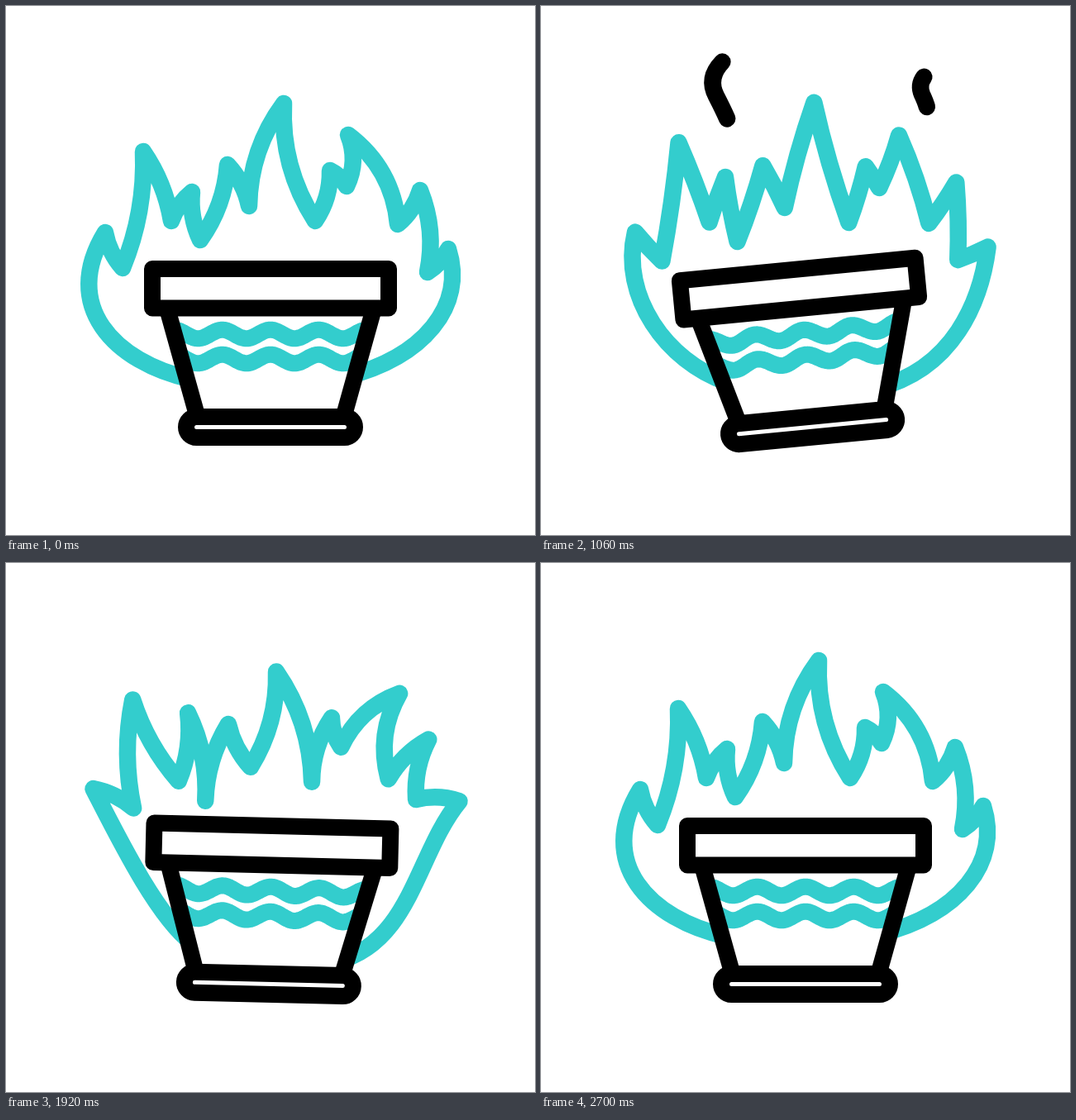
Recreate the animation shown at these times as an HTML page with a canvas. Size 640 by 640 pixels, loop 3.02 s.

```html
<!DOCTYPE html>
<html lang="en">
<head>
<meta charset="utf-8">
<title>Fire bucket</title>
<style>
html, body { margin: 0; width: 100%; height: 100%; overflow: hidden; background: #fff; }
canvas { display: block; width: 640px; height: 640px; }
</style>
</head>
<body>
<canvas id="stage" width="640" height="640"></canvas>
<script>
const ctx = document.getElementById('stage').getContext('2d');
const LOOP = 3020, TEAL = '#33cdcd', INK = '#000', MID = 320;

// Each tongue rests at tip, stretches by reach as the fire flares, and may sag later on.
// The dip is the notch to its right; a positive curl bulges both flanks to the right.
const tongues = [
  { tip: [120, 274], reach: [-15, -1], dip: [141, 317], curl: -0.14 },
  { tip: [166, 176], reach: [10, -36], dip: [200, 260], curl: 0.11, sag: [-24, 26] },
  { tip: [225, 225], reach: [-5, -45], dip: [235, 283], curl: -0.14 },
  { tip: [268, 192], reach: [1, 3], dip: [294, 242], curl: 0.14 },
  { tip: [336, 118], reach: [-17, -13], dip: [374, 260], curl: -0.16, sag: [8, 28] },
  { tip: [392, 199], reach: [2, -12], dip: [412, 218], curl: 0.16 },
  { tip: [414, 156], reach: [38, 1], dip: [474, 264], curl: 0.22, sag: [27, 1] },
  { tip: [501, 223], reach: [-1, -32], dip: [510, 322], curl: 0.15, sag: [12, 23] },
  { tip: [535, 294], reach: [14, -6], curl: 0.15 }
];

const clamp = v => Math.max(0, Math.min(1, v));
const ease = p => (1 - Math.cos(Math.PI * clamp(p))) / 2;
const along = (from, to, k) => from.map((v, i) => v + (to[i] - v) * k);

// Eases from each [time, value] key to the next.
const follow = (keys, t) => keys.slice(1).reduce((value, [end, next], i) =>
  value + (next - keys[i][1]) * ease((t - keys[i][0]) / (end - keys[i][0])), keys[0][1]);

const flareAt = t => follow([[170, 0], [700, 1], [1340, 0], [1860, 1], [2400, 0]], t);
const sagAt = t => follow([[700, 0], [2160, 1], [2700, 0]], t);
const tiltAt = t => follow([[0, 0], [600, 10], [1120, -6], [1610, 3], [2200, 0]], t);

const tipAt = ({ tip, reach, sag = [0, 0] }, flare, sink) =>
  tip.map((v, i) => v + reach[i] * flare + sag[i] * sink);

// Dips close in on the middle, and the outermost ones rise.
function dipAt([x, y], flare) {
  const side = (x - MID) / 185;
  return [x - 14 * side * flare, y + (5 - 34 * side ** 8) * flare];
}

function curveTo([x0, y0], [x1, y1], bend) {
  ctx.quadraticCurveTo((x0 + x1) / 2 + (y1 - y0) * bend, (y0 + y1) / 2 - (x1 - x0) * bend, x1, y1);
}

function drawFlame(flare, sink) {
  const blend = (calm, flared) => along(calm, flared, flare);
  const tips = tongues.map(tongue => tipAt(tongue, flare, sink));
  const flip = 1 - 2 * flare;

  ctx.strokeStyle = TEAL;
  ctx.lineWidth = 20.5;
  ctx.beginPath();
  ctx.moveTo(...blend([225, 452], [225, 460]));
  ctx.bezierCurveTo(...blend([130, 431], [185, 428]), ...blend([66, 362], [140, 335]), ...tips[0]);
  tongues.slice(0, -1).forEach(({ dip, curl }, i) => {
    const low = dipAt(dip, flare);
    curveTo(tips[i], low, curl * flip);
    curveTo(low, tips[i + 1], -tongues[i + 1].curl * flip);
  });
  ctx.bezierCurveTo(...blend([557, 363], [495, 350]), ...blend([505, 425], [490, 460]),
    ...blend([410, 449], [400, 483]));
  ctx.stroke();
}

function drawWave(halfWidth, y) {
  ctx.beginPath();
  for (let x = -halfWidth; x <= halfWidth; x += 2) {
    ctx.lineTo(MID + x, y - 5.3 * Math.cos(x * 2 * Math.PI / 58.4));
  }
  ctx.stroke();
}

function drawPot(degrees) {
  ctx.save();
  ctx.translate(MID, 420);
  ctx.rotate(degrees * Math.PI / 180);
  ctx.translate(-MID, -420);
  ctx.fillStyle = '#fff';
  ctx.lineWidth = 20;

  ctx.fill(new Path2D('M195 366L231 495H409L445 366Z'));
  ctx.strokeStyle = TEAL;
  ctx.lineCap = 'butt';
  drawWave(116, 397);
  drawWave(108, 427);

  ctx.strokeStyle = INK;
  ctx.stroke(new Path2D('M195 366L231 495M445 366L409 495'));
  const rim = new Path2D('M177 318H463V365.5H177Z');
  const foot = new Path2D();
  foot.roundRect(218, 497, 204, 25, 12.5);
  for (const part of [rim, foot]) {
    ctx.fill(part);
    ctx.stroke(part);
  }
  ctx.restore();
}

function smoke(d) {
  const el = document.createElementNS('http://www.w3.org/2000/svg', 'path');
  el.setAttribute('d', d);
  return { path: new Path2D(d), length: el.getTotalLength() };
}
const tall = smoke('M220 171Q238 148 237 133Q237 126 219 91Q207 68 228 48');
const small = smoke('M378 146Q386 136 385 126Q385 119 378 104Q373 92 381 82');

function drawSmoke({ path, length }, age, dx = 0, dy = 0) {
  const head = clamp(age / 525), tail = clamp((age - 320) / 460);
  if (head <= tail) return;
  ctx.save();
  ctx.translate(dx, dy);
  ctx.strokeStyle = INK;
  ctx.lineWidth = 20.5;
  ctx.setLineDash([(head - tail) * length, length * 2]);
  ctx.lineDashOffset = -tail * length;
  ctx.stroke(path);
  ctx.restore();
}

function draw() {
  const t = performance.now() % LOOP;
  ctx.fillStyle = '#fff';
  ctx.fillRect(0, 0, 640, 640);
  ctx.lineCap = ctx.lineJoin = 'round';
  drawFlame(flareAt(t), sagAt(t));
  drawPot(tiltAt(t));
  for (const start of [20, 1135]) {
    drawSmoke(tall, t - start);
    drawSmoke(small, t - start);
  }
  drawSmoke(tall, t - 545, -7, 18);
  drawSmoke(small, t - 545, 83, 3);
  requestAnimationFrame(draw);
}
draw();
</script>
</body>
</html>
```
